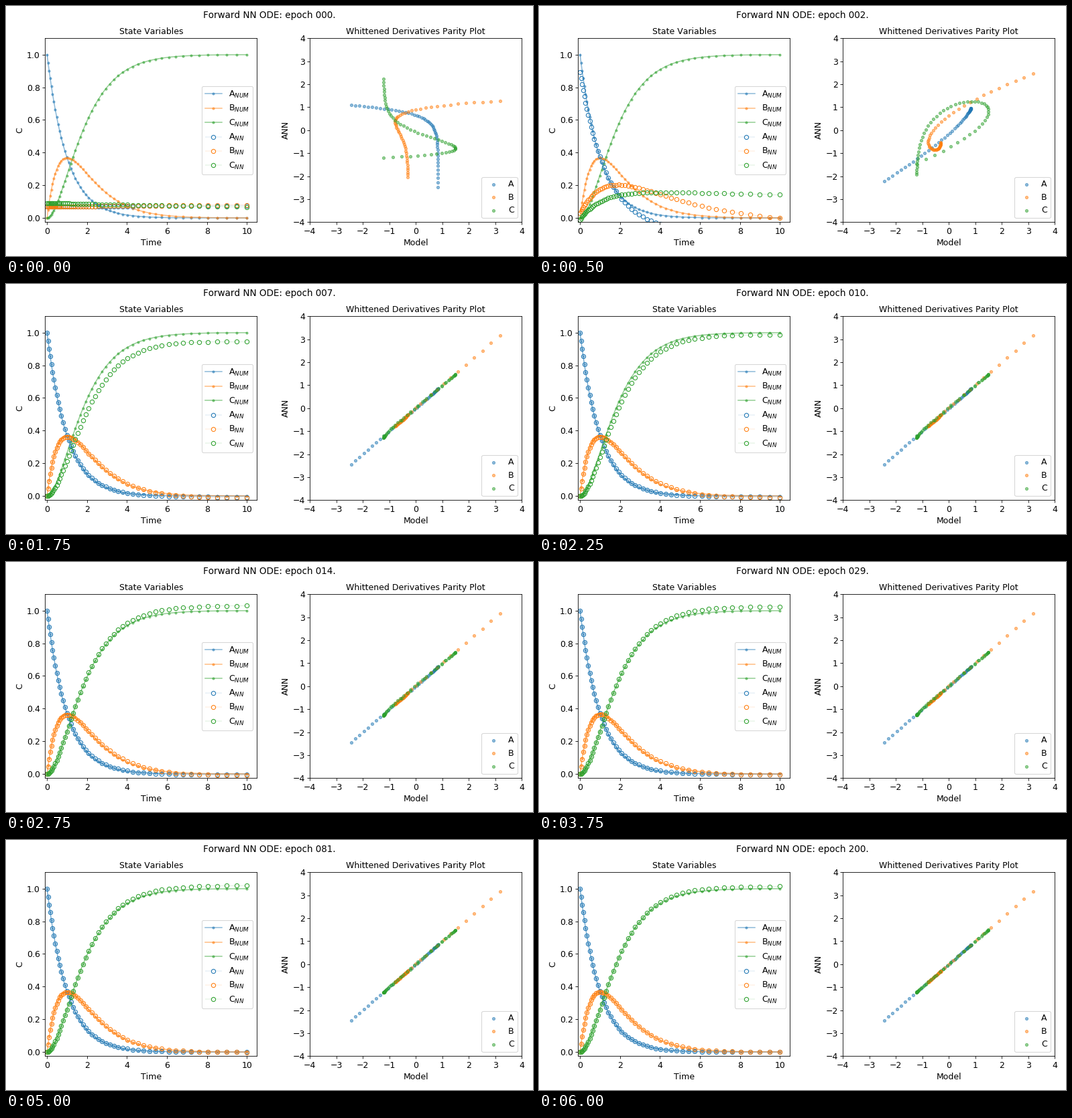
These frames come from a looping animation (786 px wide and 374 px high, 6.25 s). A matplotlib script:

```python
import numpy as np
import matplotlib.pyplot as plt
from matplotlib.animation import FuncAnimation

W, H, DPI = 786, 374, 75
EPOCHS = [0, 1, 2, 3, 4, 5, 6, 7, 8, 10, 12, 14, 17, 20, 24, 29, 36, 44,
          54, 66, 81, 101, 127, 160, 200]
NAMES = "ABC"
COLORS = ["tab:blue", "tab:orange", "tab:green"]

plt.rcParams.update({
    "font.family": "DejaVu Sans",
    "font.size": 12,
    "axes.titlesize": "medium",
    "axes.labelsize": "medium",
    "legend.fontsize": "medium",
    "text.kerning_factor": 6,
})

t = np.geomspace(1, 11, 50) - 1


# Series reaction A -> B -> C with unit rate constants
def exact(k=1.0):
    decay = np.exp(-t)
    return np.array([decay, t * decay, 1 - (1 + k * t) * np.exp(-k * t)])


def rates(y):
    """Reaction rates of the given states, scaled to zero mean, unit std."""
    a, b, _ = y
    r = np.array([-a, a - b, b])
    return (r - r.mean(axis=1, keepdims=True)) / r.std(axis=1, keepdims=True)


def bell(center, width):
    return np.exp(-((t - center) / width)**2)


def untrained():
    return np.array([
        0.070 + 0.018 * (np.exp(t / 40) - 1),
        0.069 + 0.034 * (1 - np.exp(-t / 25)),
        0.092 + 0.0013 * t - 0.1125 * (1 - np.exp(-t / 25)),
    ])


def rough():
    return np.array([
        0.973 * np.exp(-0.77 * t) - 0.08,
        0.03 + 0.2477 * t * np.exp(-t / 2) - 0.00466 * t,
        -0.01 + 0.184 * (1 - np.exp(-0.95 * t)) - 0.0032 * t,
    ])


def fitted(bump, drift, gain, k=1.0):
    """Exact solution plus a small residual error."""
    return exact(k) + np.array([
        0.5 * bump * bell(3, 1.6) - 0.5 * drift * t,
        bump * (bell(4, 2) - 0.5 * bell(1, 0.7)) - drift * t,
        gain * (1 - bell(0, 5)),
    ])


STAGES = [
    (0, untrained()),
    (2, rough()),
    (7, fitted(0.010, 0.0014, -0.054, 0.88)),
    (11, fitted(0.011, 0.0010, 0.031)),
    (15, fitted(0.008, 0.0006, 0.026)),
    (20, fitted(0.005, 0.0002, 0.020)),
    (24, fitted(0.001, 0.0, 0.014)),
]


def network(i):
    """States predicted at step i, blended between training stages."""
    j = max(n for n, (s, _) in enumerate(STAGES[:-1]) if s <= i)
    (s0, y0), (s1, y1) = STAGES[j:j + 2]
    u = (i - s0) / (s1 - s0)
    if j == 1:
        u = 1 - (1 - u)**2
    return (1 - u) * y0 + u * y1


fig = plt.figure(figsize=(W / DPI, H / DPI), dpi=DPI)


def panel(left, title, xlabel, ylabel):
    ax = fig.add_axes([left / W, 50.75 / H, 316 / W, 275 / H])
    ax.set_title(title)
    ax.set_xlabel(xlabel)
    ax.set_ylabel(ylabel)
    return ax


ax1 = panel(58.25, "State Variables", "Time", "C")
ax2 = panel(453.25, "Whittened Derivatives Parity Plot", "Model", "ANN")
heading = fig.suptitle("", fontsize=13, y=0.98)

for name, color, y in zip(NAMES, COLORS, exact()):
    ax1.plot(t, y, ".-", color=color, alpha=0.5, label=name + "$_{NUM}$")
circles = [
    ax1.plot(t, t, "o--", color=color, lw=0.2, mfc="none", mec=color,
             label=name + "$_{NN}$")[0]
    for name, color in zip(NAMES, COLORS)
]
ax1.set(xlim=(-0.1, 10.5), ylim=(-0.025, 1.1),
        xticks=range(0, 11, 2), yticks=np.arange(6) / 5)
ax1.legend(loc="center right")

model = rates(exact())
dots = [
    ax2.scatter(x, x, s=16, color=color, alpha=0.5, label=name)
    for name, color, x in zip(NAMES, COLORS, model)
]
ax2.set(xlim=(-4, 4), ylim=(-4, 4), xticks=range(-4, 5), yticks=range(-4, 5))
ax2.legend(loc="lower right")


def update(i):
    y = network(i)
    dy = rates(y)
    for k in range(3):
        circles[k].set_ydata(y[k])
        dots[k].set_offsets(np.column_stack([model[k], dy[k]]))
    heading.set_text(f"Forward NN ODE: epoch {EPOCHS[i]:03d}.")
    return [heading, *circles, *dots]


anim = FuncAnimation(fig, update, frames=len(EPOCHS), interval=250,
                     init_func=lambda: update(0), repeat=True, repeat_delay=0)
plt.show()
```
